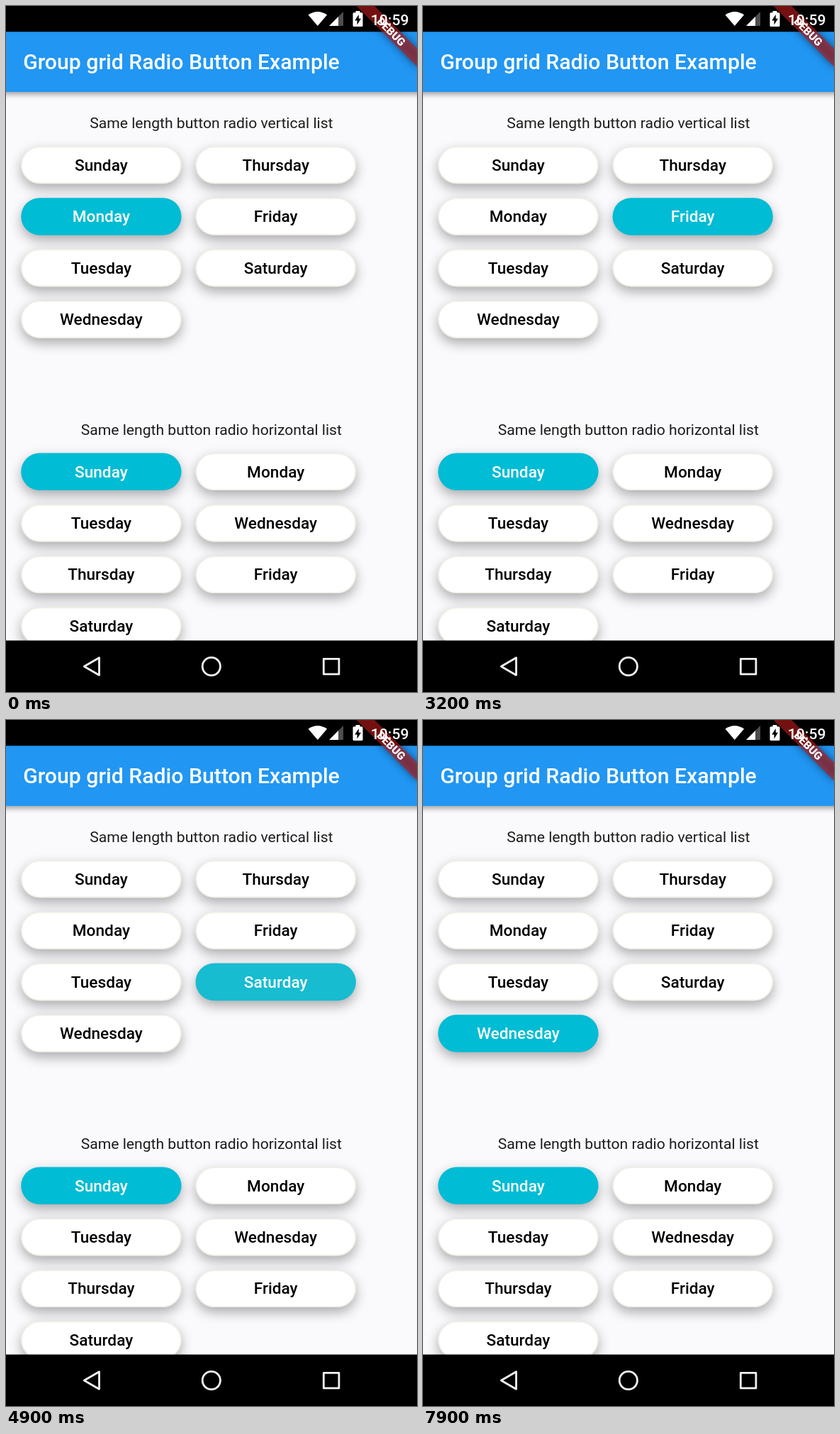
An HTML page with a canvas for the animation above (8000 ms loop, 580x966 px).

```html
<!DOCTYPE html>
<html lang="en">
<head>
<meta charset="utf-8">
<title>Radio buttons</title>
<style>
html, body { margin: 0; width: 100%; height: 100%; overflow: hidden; background: #faf9fc; }
canvas { display: block; width: 580px; height: 966px; }
</style>
</head>
<body>
<canvas id="stage" width="580" height="966"></canvas>
<script>
const ctx = document.getElementById('stage').getContext('2d');
const W = 580, H = 966, DP = 1.51, LOOP = 8000, STEP = 100;
const DAYS = ['Sunday', 'Monday', 'Tuesday', 'Wednesday', 'Thursday', 'Friday', 'Saturday'];
const TEAL = '#00bcd4';

// [time of press, day index]; the choice follows HOLD ms later
const TAPS = [[1000, 0], [2100, 4], [2700, 5], [3400, 1], [4200, 2], [4700, 6], [5400, 3]];
const FIRST = 1, HOLD = 100, FADE = 200;

function text(str, x, y, size, weight, color, align = 'center') {
  ctx.font = `${weight} ${size}px Roboto, sans-serif`;
  ctx.textAlign = align;
  ctx.fillStyle = color;
  ctx.fillText(str, x, y);
}

function shadow(color, blur, y) {
  ctx.shadowColor = color;
  ctx.shadowBlur = blur;
  ctx.shadowOffsetY = y;
}

function polygon(...points) {
  ctx.beginPath();
  points.forEach(([x, y]) => ctx.lineTo(x, y));
  ctx.closePath();
}

function button(label, col, cy, selected, ink) {
  const w = 226.4, h = 52.6, x = 21.2 + col * 246.3, y = cy - h / 2;
  ctx.save();
  ctx.beginPath();
  ctx.roundRect(x, y, w, h, h / 2);
  ctx.save();
  shadow('rgba(0,0,0,.32)', 17, 7);
  ctx.fillStyle = selected ? TEAL : '#fff';
  ctx.fill();
  ctx.restore();
  if (ink > 0) {
    ctx.fillStyle = `rgba(188,188,188,${ink})`;
    ctx.fill();
  }
  if (!selected) {
    ctx.beginPath();
    ctx.roundRect(x + .75, y + .75, w - 1.5, h - 1.5, h / 2 - .75);
    ctx.strokeStyle = '#efede2';
    ctx.lineWidth = 1.5;
    ctx.stroke();
  }
  text(label, x + w / 2, cy + 7.7, 15 * DP, 500, selected ? '#fff' : '#000');
  ctx.restore();
}

function appBar() {
  ctx.save();
  shadow('rgba(0,0,0,.4)', 8, 3);
  ctx.fillStyle = '#2196f3';
  ctx.fillRect(-20, 0, W + 40, 121);
  ctx.restore();
  ctx.fillStyle = '#000';
  ctx.fillRect(0, 0, W, 36.3);
  text('Group grid Radio Button Example', 24.2, 89.3, 20 * DP, 500, '#fff', 'left');
}

function banner() {
  ctx.save();
  ctx.translate(W, 0);
  ctx.rotate(Math.PI / 4);
  const box = [-40 * DP, 28 * DP, 80 * DP, 12 * DP];
  ctx.save();
  shadow('rgba(0,0,0,.5)', 12, 0);
  ctx.fillStyle = '#000';
  // only the offset shadow lands on the stage
  ctx.shadowOffsetX = 2000;
  ctx.translate(-2000 * Math.SQRT1_2, 2000 * Math.SQRT1_2);
  ctx.fillRect(...box);
  ctx.restore();
  ctx.fillStyle = 'rgba(183,28,28,.627)';
  ctx.fillRect(...box);
  text('DEBUG', 0, 34 * DP + 5.4, 10.2 * DP, 900, '#fff');
  ctx.restore();
}

function statusIcons() {
  ctx.fillStyle = '#fff';
  ctx.beginPath();
  ctx.moveTo(439.8, 28);
  ctx.lineTo(426.5, 12.6);
  ctx.quadraticCurveTo(439.8, 3.6, 453.1, 12.6);
  ctx.closePath();
  ctx.fill();

  polygon([476, 8], [476, 28], [456, 28]);
  ctx.fillStyle = '#4d4d4d';
  ctx.fill();
  polygon([469, 15], [469, 28], [456, 28]);
  ctx.fillStyle = '#fff';
  ctx.fill();

  ctx.beginPath();
  ctx.roundRect(489.5, 9.3, 14, 19.7, 1.5);
  ctx.rect(493.5, 7, 6, 3);
  ctx.fill();
  polygon([497.8, 12], [492.2, 20.4], [495.5, 20.4], [495.5, 26.5], [501, 17.8], [497.8, 17.8]);
  ctx.fillStyle = '#000';
  ctx.fill();

  text('10:59', 541.6, 26.5, 14 * DP, 500, '#fff');
}

function navBar() {
  ctx.fillStyle = '#000';
  ctx.fillRect(0, 893.5, W, H - 893.5);
  ctx.strokeStyle = '#f2f2f2';
  ctx.lineWidth = 2.8;
  ctx.lineJoin = 'round';
  polygon([110.3, 930], [131.5, 917.8], [131.5, 942.2]);
  ctx.stroke();
  ctx.beginPath();
  ctx.arc(289.8, 930, 12.6, 0, Math.PI * 2);
  ctx.stroke();
  ctx.strokeRect(448.3, 919.3, 21.6, 21.6);
}

function choice(t) {
  let selected = FIRST;
  const ink = {};
  for (const [start, day] of TAPS) {
    const age = t - start;
    if (age < 0) break;
    if (age >= HOLD) selected = day;
    ink[day] = age < HOLD ? .16 + .1 * age / HOLD
      : .24 * Math.max(0, 1 - (age - HOLD) / FADE);
  }
  return { selected, ink };
}

function draw(t) {
  const { selected, ink } = choice(t);
  ctx.fillStyle = '#faf9fc';
  ctx.fillRect(0, 0, W, H);
  text('Same length button radio vertical list', 289.8, 171.8, 14 * DP, 400, '#1c1c1c');
  text('Same length button radio horizontal list', 289.8, 603.6, 14 * DP, 400, '#1c1c1c');
  DAYS.forEach((day, i) => {
    button(day, i >> 2, 224 + (i % 4) * 72.45, i === selected, ink[i]);
    button(day, i % 2, 655.8 + (i >> 1) * 72.45, i === 0, 0);
  });
  appBar();
  banner();
  statusIcons();
  navBar();
}

function tick(now) {
  draw(Math.floor((now % LOOP) / STEP) * STEP);
  requestAnimationFrame(tick);
}
draw(0);
requestAnimationFrame(tick);
</script>
</body>
</html>
```
